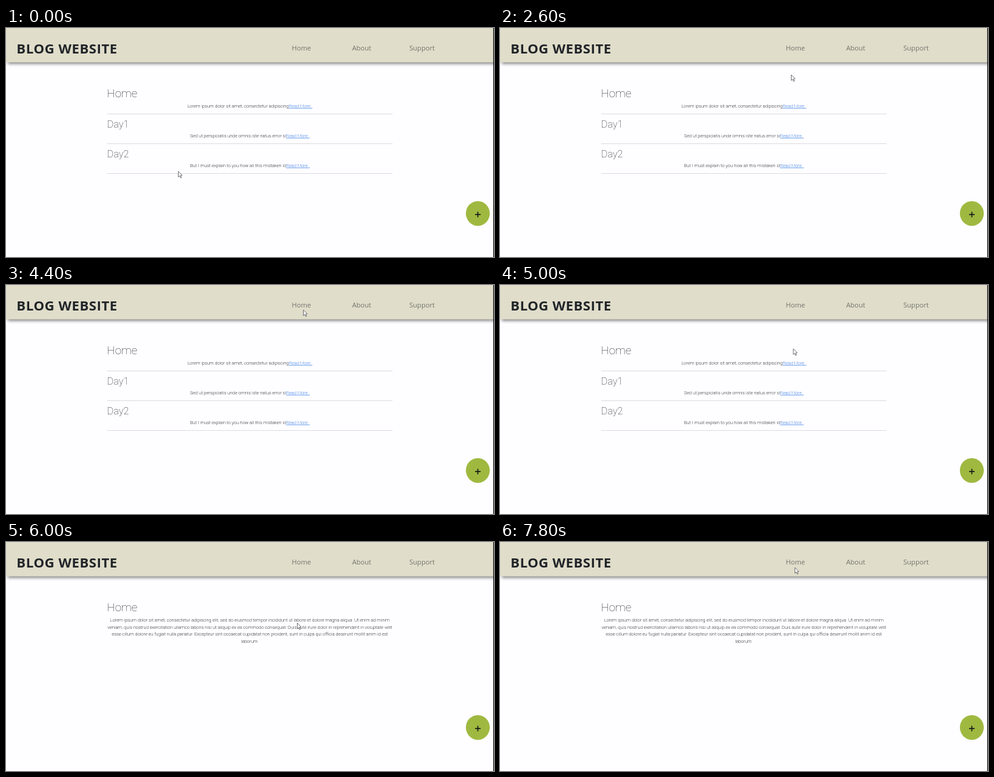
Recreate the animation shown at these times as an HTML page with a canvas. Size 800x377 px, loop 8000 ms.

```html
<!DOCTYPE html>
<html lang="en">
<head>
<meta charset="utf-8">
<title>Blog</title>
<style>
html, body { margin: 0; width: 100%; height: 100%; overflow: hidden; background: #fefdff; }
canvas { display: block; width: 800px; height: 377px; }
</style>
</head>
<body>
<canvas id="stage"></canvas>
<script>
const W = 800, H = 377, LOOP = 8000, STEP = 200, OPEN_AT = 6000;
const canvas = document.getElementById('stage');
const ratio = window.devicePixelRatio || 1;
canvas.width = W * ratio;
canvas.height = H * ratio;
const ctx = canvas.getContext('2d');
ctx.scale(ratio, ratio);

const INK = '#212529', LINK = '#2f78e4';
const SANS = '"Open Sans", "Noto Sans", sans-serif';
const THIN = 'Roboto, "Open Sans", sans-serif';
const BODY = `100 7.54px ${THIN}`;
const MID = 399.8;

const posts = [
  ['Home', 18.74, 114.2, 'Lorem ipsum dolor sit amet, consectetur adipiscing'],
  ['Day1', 16.4, 164.2, 'Sed ut perspiciatis unde omnis iste natus error si'],
  ['Day2', 16.4, 213.2, 'But I must explain to you how all this mistaken id']
];
const article = [
  'Lorem ipsum dolor sit amet, consectetur adipiscing elit, sed do eiusmod tempor incididunt ut labore et dolore magna aliqua. Ut enim ad minim',
  'veniam, quis nostrud exercitation ullamco laboris nisi ut aliquip ex ea commodo consequat. Duis aute irure dolor in reprehenderit in voluptate velit',
  'esse cillum dolore eu fugiat nulla pariatur. Excepteur sint occaecat cupidatat non proident, sunt in culpa qui officia deserunt mollit anim id est',
  'laborum.'
];

// Pointer legs: start time, end time, end x, end y
const legs = [
  [200, 600, 412.5, 237],
  [1200, 2200, 478, 133.5],
  [2200, 2600, 477.5, 77],
  [2600, 3200, 486.5, 42.5],
  [3800, 4000, 487.5, 41],
  [4400, 5400, 478, 133],
  [5600, 5800, 477.5, 133.3],
  [6600, 7400, 483.5, 43.5],
  [7600, 7800, 483.5, 42]
];

function pointerAt(time) {
  const t = Math.floor(time / STEP) * STEP;
  let x = 282.5, y = 236;
  for (const [from, to, ex, ey] of legs) {
    if (t <= from) break;
    const p = Math.min(1, (t - from) / (to - from));
    const k = p * (2 - p) * 0.4 + p * 0.6;
    x += (ex - x) * k;
    y += (ey - y) * k;
  }
  return [x, y];
}

function text(str, x, y, font, color, align = 'left') {
  ctx.font = font;
  ctx.fillStyle = color;
  ctx.textAlign = align;
  ctx.fillText(str, x, y);
}

// Hairline type is painted twice so that it keeps its contrast
function thinText(...args) {
  text(...args);
  text(...args);
}

function rect(x, y, w, h, color) {
  ctx.fillStyle = color;
  ctx.fillRect(x, y, w, h);
}

function drawHeader() {
  ctx.save();
  ctx.shadowColor = '#858585';
  ctx.shadowBlur = 5 * ratio;
  ctx.shadowOffsetX = 3 * ratio;
  ctx.shadowOffsetY = 2.4 * ratio;
  rect(0, 0, W, 56.5, '#e0ddca');
  ctx.restore();
  ctx.letterSpacing = '0.5px';
  text('BLOG WEBSITE', 17.3, 41.5, `700 22.1px ${SANS}`, INK);
  ctx.letterSpacing = '0px';
  const nav = `400 11.1px ${SANS}`;
  text('Home', 468.5, 37, nav, '#74746c');
  text('About', 567.5, 37, nav, '#74746c');
  text('Support', 661.2, 37, nav, '#74746c');
}

function drawList() {
  posts.forEach(([title, size, y, intro], i) => {
    const more = 'Read More..', base = 131.3 + i * 49;
    text(title, 165.5, y, `100 ${size}px ${THIN}`, INK);
    ctx.font = BODY;
    const a = ctx.measureText(intro).width, b = ctx.measureText(more).width;
    const x = MID - (a + b) / 2;
    thinText(intro, x, base, BODY, INK);
    thinText(more, x + a, base, BODY, LINK);
    rect(x + a, base + 0.5, b, 0.7, LINK);
    rect(166, 141 + i * 49, 467.5, 1, '#dbdae0');
  });
}

function drawArticle() {
  text('Home', 165.5, 114.2, `100 18.74px ${THIN}`, INK);
  article.forEach((line, i) => thinText(line, MID, 131.3 + i * 11.42, BODY, INK, 'center'));
}

function drawButton() {
  ctx.fillStyle = '#9fb940';
  ctx.beginPath();
  ctx.ellipse(773.5, 305.3, 19.6, 20.4, 0, 0, Math.PI * 2);
  ctx.fill();
  rect(769, 306.2, 9, 1.8, '#1d211b');
  rect(772.6, 302.6, 1.8, 9, '#1d211b');
}

const arrow = new Path2D('M0 0V9.4L2.2 7.4L3.8 10.9L5.2 10.3L3.7 6.9L6.4 6.6Z');
const hand = new Path2D('M-1 7V.8Q0-.6 1 .8V4.5L4.8 5.3Q6 5.6 6 7L5.2 10.5V12H-.8V10.8L-4 7.4Q-3.8 5.6-2.3 6.4Z');

function drawPointer(x, y, isHand) {
  const shape = isHand ? hand : arrow;
  ctx.save();
  ctx.translate(x, y);
  ctx.fillStyle = '#fff';
  ctx.strokeStyle = '#55555c';
  ctx.lineWidth = 0.85;
  ctx.lineJoin = 'round';
  ctx.fill(shape);
  ctx.stroke(shape);
  ctx.restore();
}

function draw(time) {
  const [x, y] = pointerAt(time);
  const open = time >= OPEN_AT;
  rect(0, 0, W, H, '#fefdff');
  drawHeader();
  if (open) drawArticle(); else drawList();
  drawButton();
  rect(798.8, 0, 1.2, H, '#111');
  const overLink = !open && x > 463 && x < 502 && y > 123 && y < 135;
  drawPointer(x, y, overLink);
}

function tick(now) {
  draw(now % LOOP);
  requestAnimationFrame(tick);
}
draw(0);
requestAnimationFrame(tick);
</script>
</body>
</html>
```
